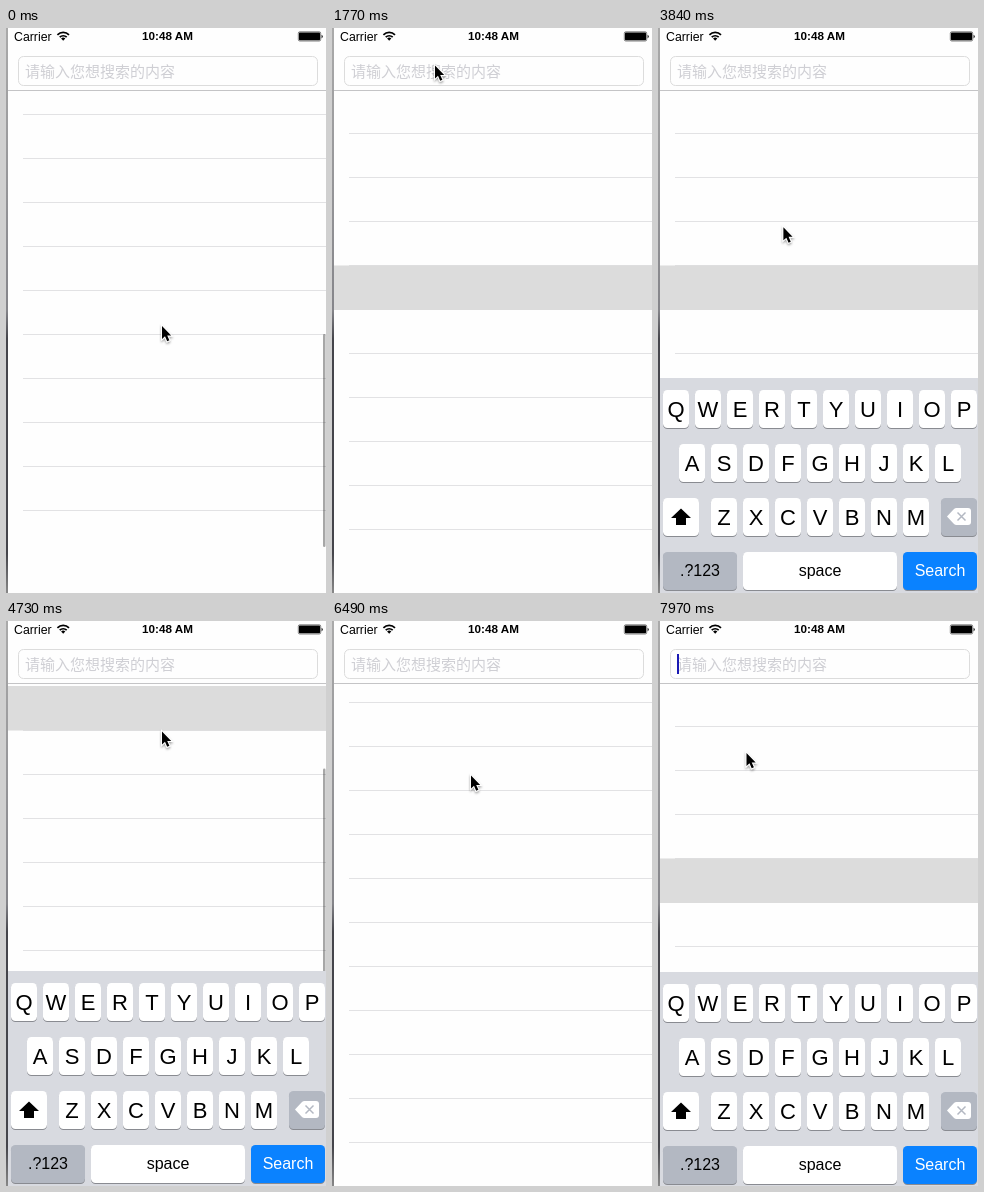
Recreate the animation shown at these times as an HTML page. Size 320 px wide and 565 px high, loop 8000 ms.

```html
<!DOCTYPE html>
<html lang="zh">
<head>
<meta charset="utf-8">
<title>Search list</title>
<style>
  html, body { margin: 0; width: 100%; height: 100%; overflow: hidden; background: #fff; }
  svg { display: block; width: 100%; height: 100%; }
  text { font-family: "Liberation Sans", Arial, sans-serif; }
  .hint { font: 300 15px "Noto Sans CJK SC", "Noto Sans CJK", sans-serif; fill: #cfcfd4; }
  .key { font-size: 22px; text-anchor: middle; }
  .word { font-size: 16px; text-anchor: middle; }
</style>
</head>
<body>
<svg viewBox="0 0 320 565">
  <defs>
    <clipPath id="table"><rect x="2" y="63" width="318" height="459"/></clipPath>
    <linearGradient id="edge" x2="0" y2="1">
      <stop offset="0" stop-color="#aaa"/>
      <stop offset=".5" stop-color="#85858a"/>
      <stop offset=".55" stop-color="#45454b"/>
      <stop offset=".93" stop-color="#45454b"/>
      <stop offset="1" stop-color="#888"/>
    </linearGradient>
    <filter id="soft" x="-50%" y="-50%" width="200%" height="200%">
      <feDropShadow dx="0" dy="1.5" stdDeviation="1" flood-opacity=".4"/>
    </filter>
  </defs>
  <rect width="320" height="565" fill="#fefefe"/>

  <g clip-path="url(#table)">
    <g id="rows"></g>
    <rect id="bar" x="317" width="2.5" rx="1.25" fill="#000" fill-opacity=".34"/>
  </g>

  <path d="M2 62.5H320" stroke="#c4c4c6"/>
  <rect x="12.5" y="28.5" width="299" height="29" rx="5" fill="#fefefe" stroke="#dcdcdc"/>
  <text class="hint" x="19" y="48.5">请输入您想搜索的内容</text>
  <rect id="caret" x="19" y="33" width="2" height="20" fill="#1a1ab4"/>

  <text x="8" y="12.7" font-size="12.3">Carrier</text>
  <path d="M51.4 6.8a8.2 8.2 0 0 1 11.6 0M53.7 9.2a5 5 0 0 1 7 0" fill="none" stroke="#000" stroke-width="1.7"/>
  <path d="M57.2 12.8l-2.1-2.2a3 3 0 0 1 4.2 0z"/>
  <text x="161.5" y="12.4" font-size="11.7" font-weight="700" text-anchor="middle">10:48 AM</text>
  <rect x="292.3" y="3.8" width="22.4" height="9.2" rx="1.5" fill="none" stroke="#000" stroke-width=".5"/>
  <rect x="293" y="4.5" width="21" height="7.8" rx=".7"/>
  <path d="M315.6 6.8a2 2 0 0 1 0 3.6z"/>

  <g id="keyboard">
    <rect x="2" y="350" width="318" height="216" fill="#d8dae0"/>
    <g id="keys"></g>
    <path d="M23 480.5L33 490H28V497H18V490H13Z"/>
    <path d="M289 488.5L296 481Q297 480 298.5 480H310Q313 480 313 483V494Q313 497 310 497H298.5Q297 497 296 496Z" fill="#fff"/>
    <path d="M299.5 484.5l8 8m0-8l-8 8" stroke="#b3b8c2" stroke-width="1.5"/>
  </g>

  <rect width="2" height="565" fill="url(#edge)"/>
  <path id="pointer" d="M0 0V13L3 10.3 5.2 15.3 7.4 14.3 5.2 9.5H9.2Z"
    stroke="#fff" stroke-width="1.8" paint-order="stroke" filter="url(#soft)"/>
</svg>
<script>
const $ = id => document.getElementById(id);
const ROW = 44, COUNT = 20, PICKED = 4, TOP = 61.5, MAX_SCROLL = 420;
const STEP = 147.6, LOOP = 8000;

function add(parent, tag, attrs, text) {
  const el = document.createElementNS("http://www.w3.org/2000/svg", tag);
  for (const name in attrs) el.setAttribute(name, attrs[name]);
  if (text) el.textContent = text;
  parent.append(el);
}

function addKey(x, y, width, label, fill = "#fff", cls = "key", ink = "#000") {
  const box = { x, width, height: 38, rx: 4.5 };
  add($("keys"), "rect", { ...box, y: y + 1, fill: "#898b91" });
  add($("keys"), "rect", { ...box, y, fill });
  const baseline = y + (cls === "key" ? 27 : 24);
  if (label) add($("keys"), "text", { x: x + width / 2, y: baseline, class: cls, fill: ink }, label);
}

for (let i = 1; i <= COUNT; i++) {
  add($("rows"), "rect", { x: 17, y: TOP + ROW * i, width: 303, height: 0.5, fill: "#c4c4c8" });
}
add($("rows"), "rect", { x: 2, y: TOP + ROW * PICKED, width: 318, height: ROW + 0.5, fill: "#dcdcdc" });

[["QWERTYUIOP", 5], ["ASDFGHJKL", 21], ["ZXCVBNM", 53]].forEach(([letters, left], row) =>
  [...letters].forEach((c, i) => addKey(left + 32 * i, 362 + 54 * row, 26, c)));
addKey(5, 470, 36);
addKey(283, 470, 36, "", "#b3b8c2");
addKey(5, 524, 74, ".?123", "#b3b8c2", "word");
addKey(85, 524, 154, "space", "#fff", "word");
addKey(245, 524, 74, "Search", "#0a82ff", "word", "#fff");

// Times below are counted in screen updates of STEP ms.
const clamp = (v, lo, hi) => Math.min(hi, Math.max(lo, v));
const smooth = u => u * u * (3 - 2 * u);
const ramp = (s, start, length) => smooth(clamp((s - start) / length, 0, 1));
const slide = (s, start) => 1 - (1 - clamp((s - start) / 3.4, 0, 1)) ** 3;

// Settle from the bottom bounce, then drag up, down and up again.
const scroll = s => 39 * 4 ** -s
  + MAX_SCROLL * (1 - ramp(s, 4, 5) + ramp(s, 29.5, 5.68) - ramp(s, 44, 5));

const pulse = (s, start, end) => ramp(s, start, 1) - ramp(s, end, 2);
const barAlpha = s => pulse(s, -1, 10) + pulse(s, 29, 39) + pulse(s, 44, 51);

const keyboardShown = s => slide(s, 19.26) - slide(s, 33.1) + slide(s, 51.19);
const focused = s => (s >= 23 && s < 31) || s >= 53;
const caretOn = s => focused(s) && (s - 23) % 6 < 3;

// Places where the pointer turns or rests: [step, x, y].
const stops = [[0, 156, 298], [8, 145, 440], [12, 103, 37.5], [17, 103, 37.5], [21, 73, 58],
  [29.5, 156, 282], [32, 156, 110.5], [44, 139, 154.5], [47, 140, 520], [51, 85, 42.5],
  [54, 88.5, 132]];

function pointerAt(s) {
  const i = clamp(stops.findIndex(([time]) => time >= s), 1, stops.length - 1);
  const [t0, x0, y0] = stops[i - 1], [t1, x1, y1] = stops[i];
  const u = ramp(s, t0, t1 - t0);
  return [x0 + (x1 - x0) * u, y0 + (y1 - y0) * u];
}

function draw(now) {
  const s = Math.floor((now % LOOP + 10) / STEP);
  const offset = Math.round(scroll(s) * 2) / 2;
  const inside = clamp(offset, 0, MAX_SCROLL);
  const over = offset - inside;
  $("rows").setAttribute("transform", `translate(0 ${-offset})`);
  $("bar").setAttribute("y", 64 + inside * 203 / MAX_SCROLL + over);
  $("bar").setAttribute("height", 252 - over);
  $("bar").setAttribute("opacity", barAlpha(s));
  $("keyboard").setAttribute("transform", `translate(0 ${Math.round(216 * (1 - keyboardShown(s)))})`);
  $("caret").setAttribute("opacity", caretOn(s) ? 1 : 0);
  $("pointer").setAttribute("transform", `translate(${pointerAt(s)})`);
}

const begin = performance.now();
function tick() {
  draw(performance.now() - begin);
  requestAnimationFrame(tick);
}
tick();
</script>
</body>
</html>
```
